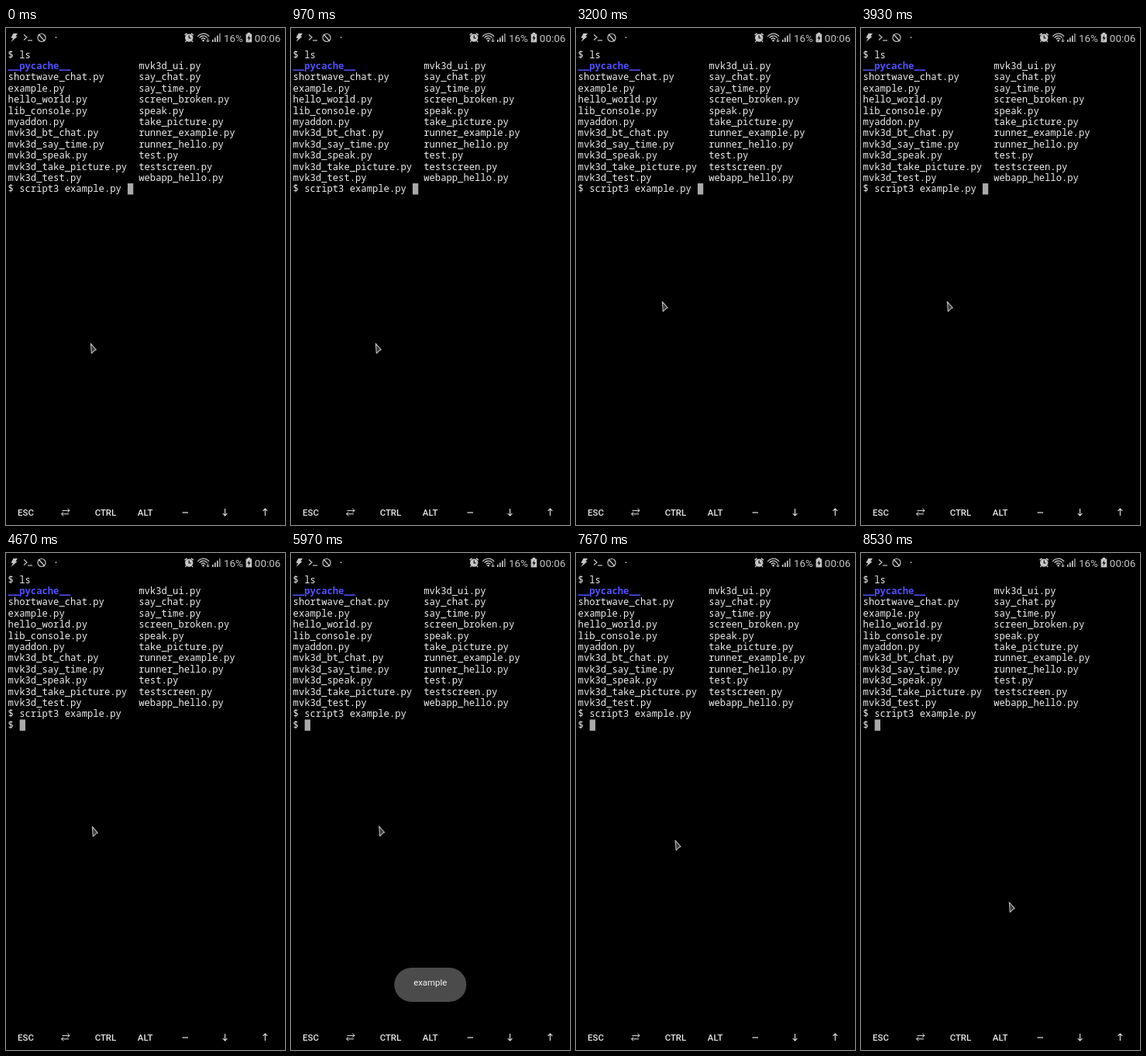
Animation of 360x640 px, one loop 8.56 s. Source, as an HTML page with a canvas:

```html
<!DOCTYPE html>
<html lang="en">
<head>
<meta charset="utf-8">
<title>Terminal</title>
<style>
html, body { margin: 0; width: 100%; height: 100%; overflow: hidden; background: #000; }
canvas { display: block; width: 360px; height: 640px; }
</style>
</head>
<body>
<canvas id="stage"></canvas>
<script>
const LOOP = 8560;
const W = 360, H = 640;
const canvas = document.getElementById('stage');
const ctx = canvas.getContext('2d');
const dpr = window.devicePixelRatio || 1;
canvas.width = W * dpr;
canvas.height = H * dpr;

const MONO = '"Noto Sans Mono", "DejaVu Sans Mono", monospace';
const SANS = 'Roboto, sans-serif';
const CELL = 7.33, ROW = 14.38, LEFT = 2.6, BASE = 38.7;
const ENTER = 3950;

const FILES = [
  ['__pycache__', 'mvk3d_ui.py'],
  ['shortwave_chat.py', 'say_chat.py'],
  ['example.py', 'say_time.py'],
  ['hello_world.py', 'screen_broken.py'],
  ['lib_console.py', 'speak.py'],
  ['myaddon.py', 'take_picture.py'],
  ['mvk3d_bt_chat.py', 'runner_example.py'],
  ['mvk3d_say_time.py', 'runner_hello.py'],
  ['mvk3d_speak.py', 'test.py'],
  ['mvk3d_take_picture.py', 'testscreen.py'],
  ['mvk3d_test.py', 'webapp_hello.py']
];

// Pointer tip: time, x, y
const PATH = [
  [0, 109, 406], [2300, 109, 406], [3000, 111, 352], [5150, 111, 352],
  [5400, 113.3, 351.5], [7450, 113.3, 351.5], [8250, 191, 449.5], [LOOP, 191, 449.5]
];

const clamp = v => Math.max(0, Math.min(1, v));
const ease = v => v * v * (3 - 2 * v);

function text(str, x, y, font, color, align = 'left') {
  ctx.font = font;
  ctx.fillStyle = color;
  ctx.textAlign = align;
  ctx.fillText(str, x, y);
}

function trace(points, closed) {
  ctx.beginPath();
  points.forEach(([x, y], i) => i ? ctx.lineTo(x, y) : ctx.moveTo(x, y));
  if (closed) ctx.closePath();
}

function line(points, color, width = 1) {
  trace(points);
  ctx.strokeStyle = color;
  ctx.lineWidth = width;
  ctx.stroke();
}

function shape(points, color) {
  trace(points, true);
  ctx.fillStyle = color;
  ctx.fill();
}

function arc(x, y, r, from, to, color, width) {
  ctx.beginPath();
  ctx.arc(x, y, r, from, to);
  ctx.strokeStyle = color;
  ctx.lineWidth = width;
  ctx.stroke();
}

function disc(x, y, r, color) {
  ctx.beginPath();
  ctx.arc(x, y, r, 0, Math.PI * 2);
  ctx.fillStyle = color;
  ctx.fill();
}

function term(str, col, row, color = '#eeeeee', weight = 400) {
  text(str, LEFT + col * CELL, BASE + row * ROW, `${weight} 12.2px ${MONO}`, color);
}

function block(col, row) {
  ctx.fillStyle = '#a9a9a9';
  ctx.fillRect(LEFT + col * CELL + 0.4, BASE + row * ROW - 11.2, 7.3, 14.4);
}

function drawStatus() {
  const c = '#c6c6c6';
  shape([[9.5, 7], [15, 7], [12.5, 10.5], [14.5, 11], [6.5, 18], [9, 13.2], [6.5, 12.6]], c);
  line([[23, 8.5], [27, 12], [23, 15.5]], c, 1.2);
  line([[28, 16], [34, 16]], c, 1.2);
  arc(46, 12.5, 5, 0, Math.PI * 2, c, 1.2);
  line([[42, 8], [50, 17]], c, 1.3);
  disc(64.5, 12.2, 0.9, c);

  // Alarm clock
  disc(236.2, 12.6, 5.2, c);
  line([[230.6, 9.2], [233.6, 6.8]], c, 1.6);
  line([[238.8, 6.8], [241.8, 9.2]], c, 1.6);
  line([[232.6, 16.4], [231.4, 18]], c, 1.4);
  line([[239.8, 16.4], [241, 18]], c, 1.4);
  line([[236.2, 9.4], [236.2, 13], [238.8, 13]], '#000', 1.2);

  // Wireless
  [3.4, 6.4, 9.4].forEach(r =>
    arc(254.6, 16.6, r, -Math.PI * 0.79, -Math.PI * 0.21, c, 1.3));
  disc(254.6, 16.2, 1.3, c);
  line([[260.5, 13.5], [260.5, 18]], c, 1);
  line([[258.5, 16], [260.5, 18], [262.5, 16]], c, 1);

  // Signal strength
  for (let i = 0; i < 4; i++) {
    const h = 3 + i * 2.6;
    ctx.fillStyle = i < 3 ? c : '#8c8c8c';
    ctx.fillRect(266 + i * 3, 18 - h, 1.7, h);
  }

  text('16%', 281, 17.5, `400 13.4px ${SANS}`, c);

  // Battery
  ctx.fillStyle = c;
  ctx.fillRect(309.6, 7.6, 7.6, 10.8);
  ctx.fillRect(311.6, 6, 3.6, 2);
  shape([[314.2, 9], [311.2, 13.6], [313.2, 13.6], [312.4, 17], [315.8, 12.2], [313.7, 12.2]], '#111');

  text('00:06', 354.2, 17.5, `400 13.4px ${SANS}`, c, 'right');
}

function drawTerminal(t) {
  term('$ ls', 0, 0);
  FILES.forEach(([a, b], i) => {
    if (i) term(a, 0, i + 1);
    else term(a, 0, 1, '#5050ff', 700);
    term(b, 23, i + 1);
  });
  term('$ script3 example.py', 0, 12);
  if (t < ENTER) {
    block(21, 12);
  } else {
    term('$', 0, 13);
    block(2, 13);
  }
}

function drawKeys() {
  const c = '#e8e8e8';
  const font = `500 11.4px ${SANS}`;
  text('ESC', 25.5, 627.6, font, c, 'center');
  text('CTRL', 128.4, 627.6, font, c, 'center');
  text('ALT', 179.6, 627.6, font, c, 'center');

  // Tab
  line([[72.5, 621.4], [82, 621.4]], c);
  line([[79.4, 618.8], [82, 621.4], [79.4, 624]], c);
  line([[71.5, 625.8], [81, 625.8]], c);
  line([[74.2, 623.2], [71.6, 625.8], [74.2, 628.4]], c);

  line([[227.5, 624], [235, 624]], c, 1.2);

  line([[282.6, 619], [282.6, 628]], c, 1.1);
  line([[279.8, 625.2], [282.6, 628], [285.4, 625.2]], c, 1.1);
  line([[334.4, 628], [334.4, 619]], c, 1.1);
  line([[331.6, 621.8], [334.4, 619], [337.2, 621.8]], c, 1.1);
}

function drawToast(t) {
  const alpha = Math.min(clamp((t - 4850) / 250), clamp((7400 - t) / 350));
  if (alpha <= 0) return;
  ctx.globalAlpha = alpha;
  ctx.beginPath();
  ctx.roundRect(133.3, 534, 93, 44, 22);
  ctx.fillStyle = '#4b4b4b';
  ctx.fill();
  text('example', 179.7, 557, `400 11.4px ${SANS}`, '#f2f2f2', 'center');
  ctx.globalAlpha = 1;
}

function drawPointer(t) {
  let i = 0;
  while (i < PATH.length - 2 && t >= PATH[i + 1][0]) i++;
  const [t0, x0, y0] = PATH[i], [t1, x1, y1] = PATH[i + 1];
  const k = ease(clamp((t - t0) / (t1 - t0)));
  ctx.save();
  ctx.translate(x0 + (x1 - x0) * k, y0 + (y1 - y0) * k);
  trace([[0.3, 0.3], [7.3, 8.3], [4.8, 9.6], [1.3, 13]], true);
  ctx.fillStyle = '#3c3c3c';
  ctx.fill();
  ctx.strokeStyle = '#b8b8be';
  ctx.lineWidth = 1.1;
  ctx.lineJoin = 'round';
  ctx.stroke();
  ctx.restore();
}

function draw(t) {
  ctx.setTransform(dpr, 0, 0, dpr, 0, 0);
  ctx.fillStyle = '#000';
  ctx.fillRect(0, 0, W, H);
  drawStatus();
  drawTerminal(t);
  drawKeys();
  drawToast(t);
  drawPointer(t);
}

const start = performance.now();
function tick() {
  draw((performance.now() - start) % LOOP);
  requestAnimationFrame(tick);
}
tick();
</script>
</body>
</html>
```
